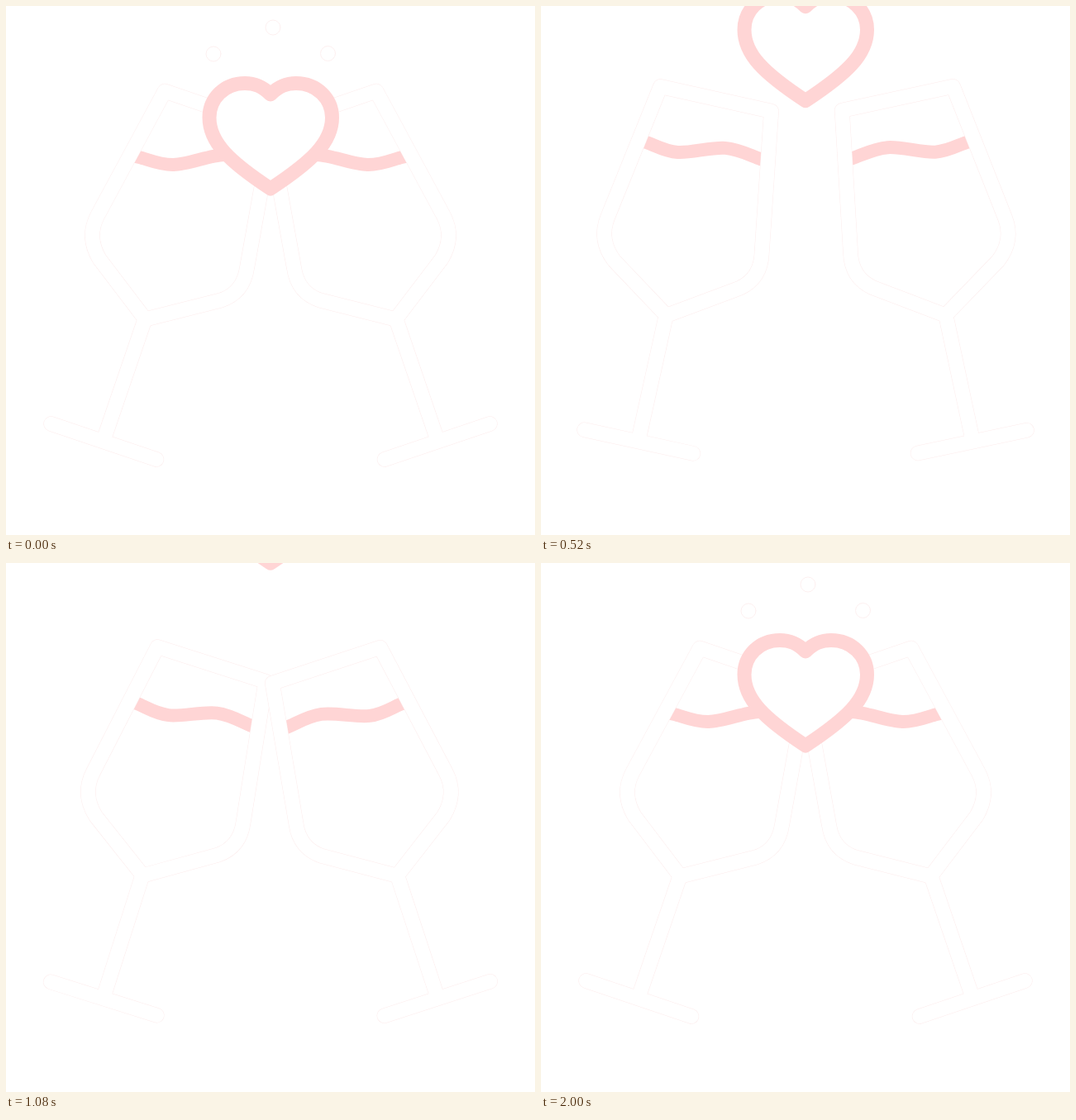
Write an HTML page with a canvas that moves like this. It is 640x640 px and loops after 2.04 s.

```html
<!DOCTYPE html>
<html lang="en">
<head>
<meta charset="utf-8">
<title>Clinking glasses</title>
<style>
  html, body { margin: 0; height: 100%; overflow: hidden; background: #fff; }
  canvas { display: block; width: 100vmin; height: 100vmin; }
</style>
</head>
<body>
<canvas id="stage" width="640" height="640"></canvas>
<script>
const ctx = document.getElementById('stage').getContext('2d');
const LOOP = 2040, STEP = 40, POP = 1150;
const PINK = '#ffd5d5', EDGE = '#fdecec', LINE = 17.4;

const bowl = new Path2D('M192 103L111 253Q97 279 113 306L168.5 379L260 356Q287 347 291.5 317L322 147.5Z');
const stem = new Path2D('M168 379L120.5 518M54.5 505.5L182 548.5');
const heart = new Path2D('M320 107C310 97 301 93.5 289 93.5C264 93.5 246 112 246 135C246 165 270 188 320 221' +
  'C370 188 394.5 165 394.5 135C394.5 112 376 93.5 351 93.5C339 93.5 330 97 320 107Z');

// Liquid surface at rest and when sloshed towards the outer wall
const calm = [[161, 183], [203, 192], [264, 180], [306, 189]];
const tilted = [[176, 155], [205, 177], [260, 191], [299, 217]];

// Keys are [time, value]; tilt is in degrees from the touching pose
const leftTilt = [[0, 0], [380, -9], [800, 0], [950, -3.4], [1160, 0]];
const rightTilt = [[0, 0], [380, -10], [770, 0], [940, -2.2], [1150, 0]];
const slosh = [[0, 0], [370, 0.95], [690, 0], [930, 1.1], [1180, 0]];

// x, resting y, height still to rise at 1240 ms, easing power
const bubbles = [[251, 58, 114, 1.2], [323, 26, 64.5, 1.22], [389.5, 57.5, 54.5, 1.45]];

const clamp = v => Math.max(0, Math.min(1, v));
const mix = (a, b, k) => a + (b - a) * k;
const ease = u => u / 2 + (1 - Math.cos(Math.PI * u)) / 4;

function valueAt(keys, t) {
  const i = keys.findIndex(key => key[0] > t);
  if (i < 0) return keys[keys.length - 1][1];
  const [t0, v0] = keys[i - 1], [t1, v1] = keys[i];
  return mix(v0, v1, ease((t - t0) / (t1 - t0)));
}

function stroke(path, color, width) {
  ctx.strokeStyle = color;
  ctx.lineWidth = width;
  ctx.stroke(path);
}

// Smooth curve through the surface points, run on into the walls
function surface(k) {
  const p = calm.map((c, i) => c.map((v, j) => mix(v, tilted[i][j], k)));
  const beyond = (a, b) => a.map((v, j) => v + (v - b[j]) * 0.3);
  const q = [beyond(p[0], p[1]), ...p, beyond(p[3], p[2])];
  const path = new Path2D();
  path.moveTo(...q[0]);
  path.lineTo(...q[1]);
  for (let i = 1; i < 4; i++) {
    const c1 = q[i].map((v, j) => v + (q[i + 1][j] - q[i - 1][j]) / 6);
    const c2 = q[i + 1].map((v, j) => v - (q[i + 2][j] - q[i][j]) / 6);
    path.bezierCurveTo(...c1, ...c2, ...q[i + 1]);
  }
  path.lineTo(...q[5]);
  return path;
}

function drawGlass(mirrored, degrees, sloshed) {
  ctx.save();
  if (mirrored) ctx.transform(-1, 0, 0, 1, 640, 0);
  ctx.translate(119, 527);
  ctx.rotate(degrees * Math.PI / 180);
  ctx.translate(-119, -527);
  ctx.fillStyle = '#fff';
  ctx.fill(bowl);
  ctx.save();
  ctx.clip(bowl);
  stroke(surface(sloshed), PINK, 16);
  ctx.restore();
  for (const [color, width] of [[EDGE, LINE + 1], ['#fff', LINE]]) {
    stroke(bowl, color, width);
    stroke(stem, color, width);
  }
  ctx.restore();
}

function drawBubbles(t) {
  const rising = t < POP;
  const r = 9 * (rising ? 1 : clamp((t - 1160) / 205));
  if (!r) return;
  for (const [x, rest, rise, power] of bubbles) {
    const left = Math.max(0, (2000 - t) / 760);
    const y = rising ? rest - 0.2045 * t : rest + rise * left ** power;
    const dot = new Path2D();
    dot.arc(x, y, r, 0, 2 * Math.PI);
    stroke(dot, EDGE, 0.8);
  }
}

function drawHeart(t) {
  const rising = t < POP;
  const size = rising ? 1 : clamp((t - POP) / 120);
  const shift = rising ? -0.2045 * t : 0.035 * (2000 - t);
  if (!size) return;
  ctx.save();
  ctx.translate(320, 157.5 + shift);
  ctx.scale(size, size);
  ctx.translate(-320, -157.5);
  ctx.fillStyle = '#fff';
  ctx.fill(heart);
  stroke(heart, PINK, 17);
  ctx.restore();
}

function draw(now) {
  const t = Math.floor(now % LOOP / STEP) * STEP;
  ctx.fillStyle = '#fff';
  ctx.fillRect(0, 0, 640, 640);
  ctx.lineCap = ctx.lineJoin = 'round';
  const k = valueAt(slosh, t);
  drawBubbles(t);
  drawGlass(false, valueAt(leftTilt, t), k);
  drawGlass(true, valueAt(rightTilt, t), k);
  drawHeart(t);
}

const start = performance.now();
function tick() {
  draw(performance.now() - start);
  requestAnimationFrame(tick);
}
tick();
</script>
</body>
</html>
```
